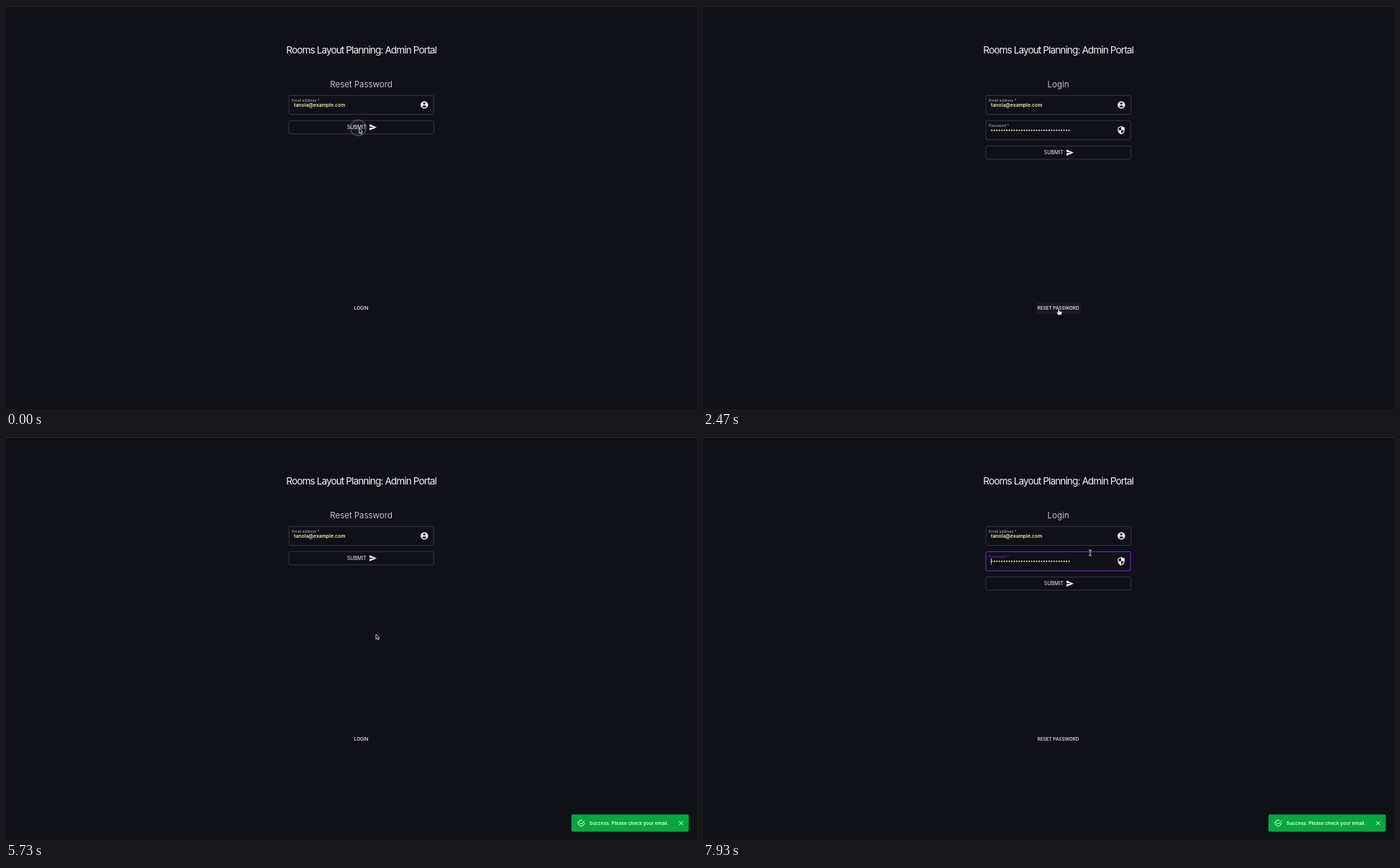
An HTML page for the animation above (8000 ms loop, 960 px wide and 560 px high).

```html
<!DOCTYPE html>
<html lang="en">
<head>
<meta charset="utf-8">
<title>Admin portal</title>
<style>
  html, body { margin: 0; width: 100%; height: 100%; overflow: hidden; background: #0f1018; }
  svg { display: block; width: 960px; height: 560px; font-family: Inter, sans-serif; fill: #f4f4f6; }
  .mid { text-anchor: middle; }
  .title { font-size: 13.6px; font-weight: 400; letter-spacing: -.9px; }
  .heading { font-size: 11.7px; font-weight: 300; }
  .label { font-size: 5.2px; fill: #b9b9c0; }
  .value { font-size: 6.8px; font-weight: 600; fill: #f0f0b4; }
  .submit { font-size: 7px; }
  .link { font-size: 6.3px; font-weight: 500; }
  .box { fill: none; stroke: #404149; stroke-width: .8; }
  .dark { fill: #0f1018; }
  .line { fill: none; stroke: #fff; stroke-linecap: round; stroke-linejoin: round; }
  .focused .box { stroke: #6325b0; stroke-width: 1.3; }
  .focused .label { fill: #6c35ad; }
  #caret { display: none; }
  .focused #caret { display: inline; }
</style>
</head>
<body>
<svg viewBox="0 0 960 560">
  <rect width="960" height="560" fill="#0f1018"/>
  <rect width="960" height="1" fill="#2c2e2d"/>
  <text class="mid title" x="493.6" y="65.6">Rooms Layout Planning: Admin Portal</text>
  <text id="heading" class="mid heading" x="493.5" y="113.2"></text>

  <rect class="box" x="393" y="124.3" width="201.3" height="26.2" rx="2"/>
  <text class="label" x="397" y="133.2">Email address *</text>
  <text class="value" x="400" y="140">tanola@example.com</text>
  <circle cx="581.2" cy="137.4" r="5.2"/>
  <circle class="dark" cx="581.2" cy="135.3" r="1.6"/>
  <path class="dark" d="M578 139.5q3.2-3.2 6.4 0q-3.2 3.6-6.4 0"/>

  <g id="password">
    <rect class="box" x="393" y="159.3" width="201" height="26.5" rx="2"/>
    <text class="label" x="397" y="168.3">Password *</text>
    <path d="M401.3 172.8H509.5" fill="none" stroke="#f0f0b4" stroke-width="2.1" stroke-linecap="round" stroke-dasharray="0 3.46"/>
    <rect id="caret" x="399.9" y="168.5" width=".8" height="9" fill="#f0f0b4"/>
    <path d="M581 166.8l4.8 2.1v3.3q-.3 4.7-4.8 6.4q-4.5-1.7-4.8-6.4v-3.3z"/>
    <path class="dark" d="M581 168v4.6h-3.7v-3zM581 172.6h3.7q-.5 3.4-3.7 4.8z"/>
  </g>

  <g id="submit">
    <rect id="submitFill" x="393" y="159" width="202" height="19" rx="2" fill="#fff"/>
    <rect class="box" x="393" y="159.2" width="201.3" height="18.5" rx="2"/>
    <text class="submit" x="473.8" y="171">SUBMIT</text>
    <path d="M505 164.2L515 168.5L505 172.8V169.4L512 168.5L505 167.6z"/>
  </g>

  <rect id="chip" y="412.3" height="15.4" rx="2" fill="#fff"/>
  <text id="link" class="mid link" x="493.5" y="422.3"></text>

  <g id="toast">
    <rect x="785.5" y="524.5" width="163" height="24" rx="2" fill="#04a83c"/>
    <path class="line" d="M803.4 536.5a4.2 4.2 0 1 1-3-4M797.2 536l2 2l4.4-4.6"/>
    <text x="810.6" y="538.9" font-size="6.6" font-weight="600">Success. Please check your email.</text>
    <path class="line" d="M935.4 534.1l5 5m0-5l-5 5"/>
  </g>

  <circle id="ring" fill="#fff" fill-opacity=".04" stroke="#76777d" stroke-width="1"/>
  <g id="cursor">
    <path id="arrow" d="M0 0V7L1.6 5.6L2.7 8L3.9 7.5L2.9 5.2H5z" fill="#111218" stroke="#e8e8ea" stroke-width=".8"/>
    <path id="hand" d="M-.8 .6q.8-1.2 1.6 0V3l3.2 .7q1 .4 .8 1.4l-.8 3.2H-.6L-2.6 5.2q.2-1.2 1.2-.6l.6 .5z" fill="#f4f4f6" stroke="#111218" stroke-width=".4"/>
    <path id="beam" class="line" d="M-1.8-4Q0-4 0-3Q0-4 1.8-4M0-3V3M-1.8 4Q0 4 0 3Q0 4 1.8 4" stroke-width=".8"/>
  </g>
</svg>
<script>
const LOOP = 8000;
const el = Object.fromEntries([...document.querySelectorAll('[id]')].map(e => [e.id, e]));

// Pointer stops: time, x, y
const path = [
  [0, 490.5, 169.8], [250, 490.5, 169.8], [600, 404, 200.5], [850, 404, 200.5], [1150, 475, 298],
  [1500, 501, 413], [1900, 501, 413], [2250, 494, 421], [3600, 494, 421], [3720, 493, 391],
  [3800, 500, 356], [3930, 504, 242], [4300, 489.5, 166], [5350, 489.5, 166],
  [5850, 518, 292], [6350, 500.5, 421], [7100, 500.5, 421], [7450, 507, 238], [7750, 538, 161], [8000, 538, 161]
];
const clicks = [-60, 1850, 3480, 4560, 6880];

const clamp = v => Math.max(0, Math.min(1, v));
const smooth = v => (v = clamp(v)) * v * (3 - 2 * v);
const within = (t, a, b) => t >= a && t < b;
const fade = (t, a, b, ms = 130) => clamp((t - a) / ms) * (1 - clamp((t - b) / ms));
const show = (e, on) => e.style.display = on ? '' : 'none';

function pointerAt(t) {
  const i = Math.max(1, path.findIndex(p => p[0] >= t));
  const [t0, x0, y0] = path[i - 1], [t1, x1, y1] = path[i];
  const k = smooth((t - t0) / (t1 - t0));
  return [x0 + (x1 - x0) * k, y0 + (y1 - y0) * k];
}

function draw(t) {
  const login = within(t, 1900, 3530) || t >= 6930;
  el.heading.textContent = login ? 'Login' : 'Reset Password';
  el.link.textContent = login ? 'RESET PASSWORD' : 'LOGIN';
  show(el.password, login);
  el.password.classList.toggle('focused', t >= 7780);
  el.submit.setAttribute('transform', `translate(0 ${login ? 35.2 : 0})`);
  el.submitFill.setAttribute('opacity', .06 * fade(t, 4230, 5400));

  const chipWidth = login ? 62 : 32;
  el.chip.setAttribute('x', 493.8 - chipWidth / 2);
  el.chip.setAttribute('width', chipWidth);
  el.chip.setAttribute('opacity', .08 * fade(t, 1640, 1900) + .04 * fade(t, 2030, 3480)
    + .09 * fade(t, 3480, 3940) + .08 * fade(t, 6480, 7060));

  const grow = smooth((t - 4850) / 230);
  el.toast.setAttribute('opacity', grow);
  el.toast.setAttribute('transform',
    `translate(867 536.5) scale(${.96 + .04 * grow}) translate(-867 -536.5)`);

  const [x, y] = pointerAt(t);
  const overLink = y > 410;
  const overSubmit = within(t, 4230, 5400);
  const overField = login && y < 186;
  el.cursor.setAttribute('transform', `translate(${x} ${y})`);
  show(el.hand, overLink || overSubmit);
  show(el.beam, overField);
  show(el.arrow, !overLink && !overSubmit && !overField);

  const click = clicks.find(c => within(t, c, c + 200));
  show(el.ring, click !== undefined);
  if (click !== undefined) {
    const age = (t - click) / 200;
    el.ring.setAttribute('cx', x - 1);
    el.ring.setAttribute('cy', y - .5);
    el.ring.setAttribute('r', 8 + 10 * age);
    el.ring.setAttribute('opacity', 1 - age * age);
  }
}

const start = performance.now();
function tick() {
  draw((performance.now() - start) % LOOP);
  requestAnimationFrame(tick);
}
tick();
</script>
</body>
</html>
```
